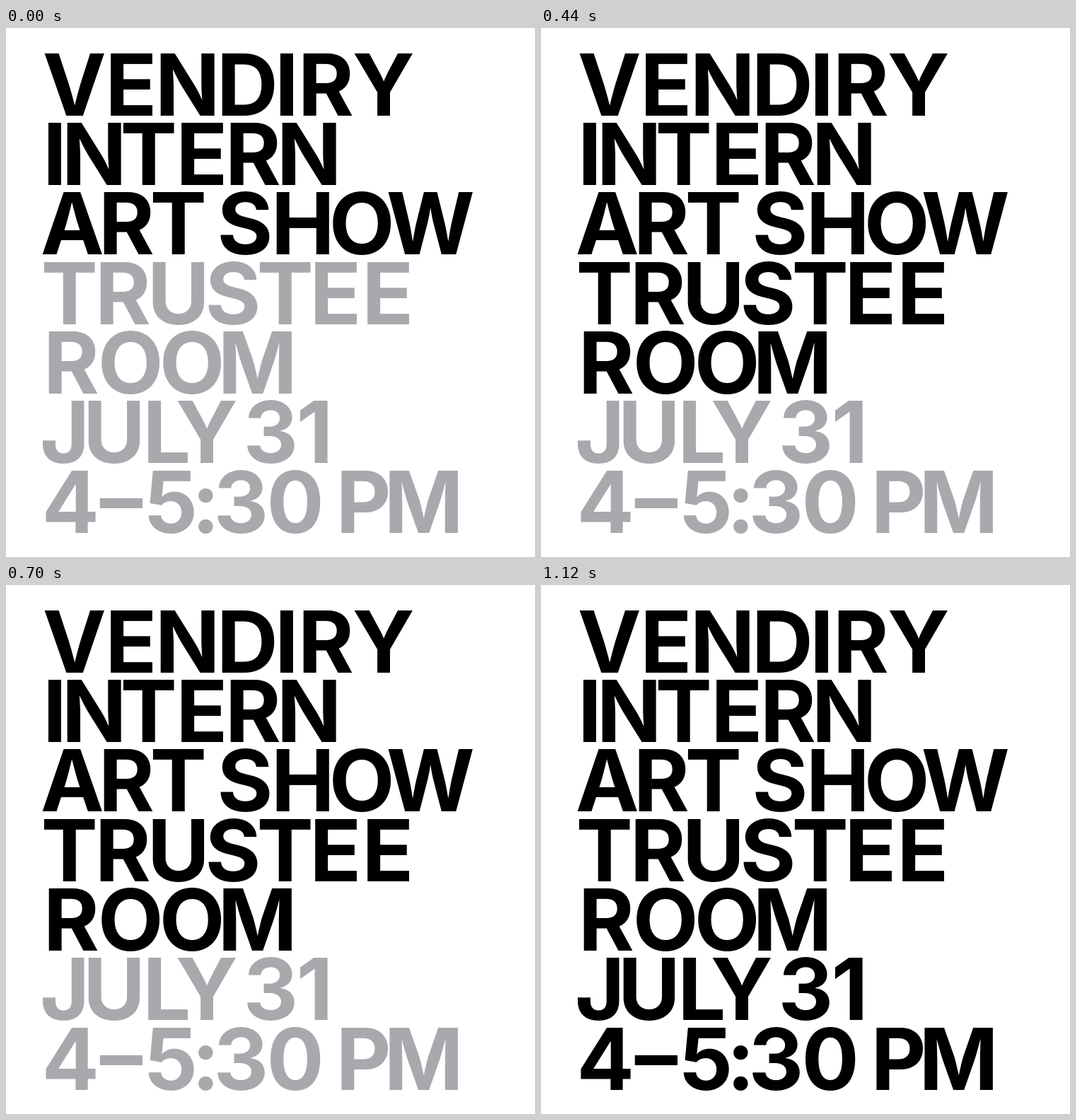
An HTML page for the animation above (1280 ms loop, 748 by 748 pixels).

```html
<!DOCTYPE html>
<html lang="en">
<head>
<meta charset="utf-8">
<title>Intern Art Show</title>
<style>
  html, body { margin: 0; width: 100%; height: 100%; overflow: hidden; background: #fff; }
  svg { display: block; width: 100vw; height: 100vh; }
  text {
    font-family: Inter, sans-serif;
    font-weight: 670;
    font-kerning: none;
    font-variant-ligatures: none;
  }
</style>
</head>
<body>
<svg id="stage" viewBox="0 0 748 748"></svg>
<script>
const LOOP = 1280, INK = '#000', PALE = '#a7a9ac';
const CAP = 88.5, FIRST = 123.7, LEADING = 98.3;
const EM = 1000;

// text, time it turns black, optical centre of each letter
const lines = [
  ['VENDIRY', 0, [97, 178, 257, 343, 397, 455, 534]],
  ['INTERN', 0, [69, 125, 202, 278, 352, 429]],
  ['ART SHOW', 0, [94, 173, 244, 338, 420, 503, 600]],
  ['TRUSTEE', 440, [90, 168, 244, 321, 395, 467, 541]],
  ['ROOM', 440, [95, 176, 263, 356]],
  ['JULY 31', 880, [82, 153, 229, 284, 375, 435]],
  ['4–5:30 PM', 880, [92, 163, 233, 283, 333, 409, 508, 591]]
];
const lift = { '–': 6 };

const pen = document.createElement('canvas').getContext('2d');
pen.font = `670 ${EM}px Inter, sans-serif`;
const size = CAP / pen.measureText('H').actualBoundingBoxAscent * EM;

// distance from a glyph's origin to the middle of its ink
function middle(ch) {
  const m = pen.measureText(ch);
  return (m.actualBoundingBoxRight - m.actualBoundingBoxLeft) / 2 * size / EM;
}

function setLine([str, start, centres], row) {
  const el = document.createElementNS('http://www.w3.org/2000/svg', 'text');
  const base = FIRST + LEADING * row;
  const xs = [], ys = [];
  let k = 0;
  for (const ch of str) {
    xs.push(ch === ' ' ? centres[k - 1] : centres[k++] - middle(ch));
    ys.push(base - (lift[ch] || 0));
  }
  el.setAttribute('x', xs.map(v => v.toFixed(2)).join(' '));
  el.setAttribute('y', ys.map(v => v.toFixed(2)).join(' '));
  el.setAttribute('font-size', size.toFixed(2));
  el.textContent = str;
  document.getElementById('stage').append(el);
  return { el, start };
}

const rows = lines.map(setLine);

function draw(now) {
  const t = now % LOOP;
  for (const { el, start } of rows) el.setAttribute('fill', t >= start ? INK : PALE);
}

function tick() {
  draw(performance.now());
  requestAnimationFrame(tick);
}
tick();
</script>
</body>
</html>
```
